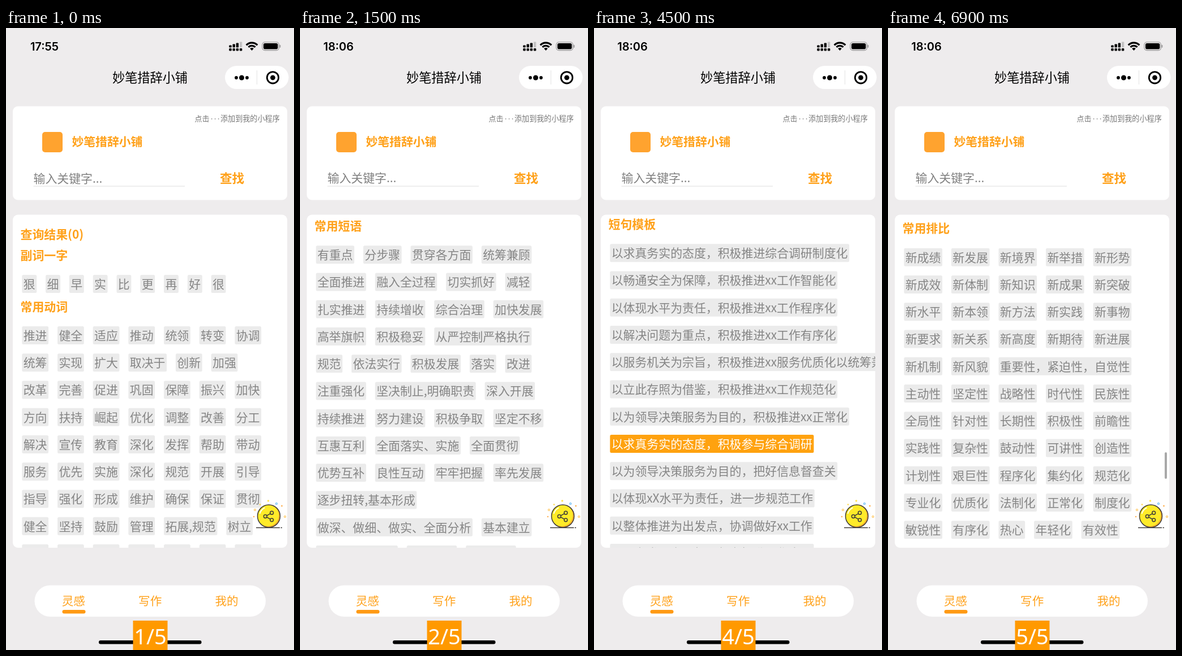
Recreate the animation shown at these times as an HTML page with a canvas. Size 509 px wide and 1101 px high, loop 7500 ms.

```html
<!DOCTYPE html>
<html lang="zh-CN">
<head>
<meta charset="utf-8">
<title>妙笔措辞小铺</title>
<style>
html, body { margin: 0; width: 100%; height: 100%; overflow: hidden; background: #eeeced; }
canvas { display: block; width: 509px; height: 1101px; }
</style>
</head>
<body>
<canvas id="stage"></canvas>
<script>
const W = 509, H = 1101, HOLD = 1500;
const CJK = '"Noto Sans CJK SC", "Noto Sans CJK JP", "Noto Sans CJK", sans-serif';
const ORANGE = '#ffa11a', GREY = '#858585', CHIP = '#ebebeb';
const EM = 20.9, ROW = 48.25, CHIP_H = 32, GAP = 15.9, LEFT = 28.3;
const APP = '妙笔措辞小铺';

// Rows are separated by lines, chips by spaces; * marks the selected chip.
const pages = [
  {
    clock: '17:55', inputY: 266,
    heads: [['查询结果(0)', 365], ['副词一字', 402], ['常用动词', 493]],
    blocks: [
      [453, '狠 细 早 实 比 更 再 好 很'],
      [544, `推进 健全 适应 推动 统领 转变 协调
统筹 实现 扩大 取决于 创新 加强
改革 完善 促进 巩固 保障 振兴 加快
方向 扶持 崛起 优化 调整 改善 分工
解决 宣传 教育 深化 发挥 帮助 带动
服务 优先 实施 深化 规范 开展 引导
指导 强化 形成 维护 确保 保证 贯彻
健全 坚持 鼓励 管理 拓展,规范 树立
提高 增强 完成 落实 建立 构建 加大`]
    ]
  },
  {
    clock: '18:06', inputY: 265,
    heads: [['常用短语', 350.5]],
    blocks: [[401.3, `有重点 分步骤 贯穿各方面 统筹兼顾
全面推进 融入全过程 切实抓好 减轻
扎实推进 持续增收 综合治理 加快发展
高举旗帜 积极稳妥 从严控制严格执行
规范 依法实行 积极发展 落实 改进
注重强化 坚决制止,明确职责 深入开展
持续推进 努力建设 积极争取 坚定不移
互惠互利 全面落实、实施 全面贯彻
优势互补 良性互动 牢牢把握 率先发展
逐步扭转,基本形成
做深、做细、做实、全面分析 基本建立
(有序)有效有力 稳步提升 不断完善`]]
  },
  {
    clock: '18:06', inputY: 265, bar: 531,
    heads: [['常用名词', 349.5]],
    blocks: [[400.5, `反映 速度 诉求 任务 形势 本质属性
重要保证 总体布局 关系 力度 战略任务
突出地位 决策部署 最大限度 内在要求
结合点 重要进展 体制机制 基本纲领
基本方略 科学性 理念意识 基本经验
基本路线 落脚点 秩序 要务 出发点
协调性 指导思想 核心 积极因素 主体
水平 方针 结构 增量 规模 标准 比重
办法 主体 作用 方式 特色 主导 差距
渠道 纽带 体系 负担 *项目 需求 倾向
资源 制度 途径 秩序 环境 主体 权威
积极性 动力 机制 目标,任务 成果 效益`]]
  },
  {
    clock: '18:06', inputY: 265,
    heads: [['短句模板', 347]],
    blocks: [[398.2, `以求真务实的态度，积极推进综合调研制度化
以畅通安全为保障，积极推进xx工作智能化
以体现水平为责任，积极推进xx工作程序化
以解决问题为重点，积极推进xx工作有序化
以服务机关为宗旨，积极推进xx服务优质化以统筹兼顾
以立此存照为借鉴，积极推进xx工作规范化
以为领导决策服务为目的，积极推进xx正常化
*以求真务实的态度，积极参与综合调研
以为领导决策服务为目的，把好信息督查关
以体现xX水平为责任，进一步规范工作
以整体推进为出发点，协调做好xx工作
以服务发展为目标，努力提升工作水平`]]
  },
  {
    clock: '18:06', inputY: 265, bar: 751,
    heads: [['常用排比', 354.5]],
    blocks: [[405.7, `新成绩 新发展 新境界 新举措 新形势
新成效 新体制 新知识 新成果 新突破
新水平 新本领 新方法 新实践 新事物
新要求 新关系 新高度 新期待 新进展
新机制 新风貌 重要性，紧迫性，自觉性
主动性 坚定性 战略性 时代性 民族性
全局性 针对性 长期性 积极性 前瞻性
实践性 复杂性 鼓动性 可讲性 创造性
计划性 艰巨性 程序化 集约化 规范化
专业化 优质化 法制化 正常化 制度化
敏锐性 有序化 热心 年轻化 有效性`]]
  }
];

const canvas = document.getElementById('stage');
const ctx = canvas.getContext('2d');
const dpr = window.devicePixelRatio || 1;
canvas.width = W * dpr;
canvas.height = H * dpr;
ctx.scale(dpr, dpr);

function box(x, y, w, h, r, color) {
  ctx.fillStyle = color;
  ctx.beginPath();
  ctx.roundRect(x, y, w, h, r);
  ctx.fill();
}

function dot(x, y, r, color) {
  ctx.fillStyle = color;
  ctx.beginPath();
  ctx.arc(x, y, r, 0, Math.PI * 2);
  ctx.fill();
}

function ring(x, y, r, width, color) {
  ctx.strokeStyle = color;
  ctx.lineWidth = width;
  ctx.beginPath();
  ctx.arc(x, y, r, 0, Math.PI * 2);
  ctx.stroke();
}

function line(color, width, ...pts) {
  ctx.strokeStyle = color;
  ctx.lineWidth = width;
  ctx.beginPath();
  pts.forEach(([x, y]) => ctx.lineTo(x, y));
  ctx.stroke();
}

function write(str, x, base, font, color, align = 'left') {
  ctx.font = font;
  ctx.fillStyle = color;
  ctx.textAlign = align;
  ctx.fillText(str, x, base);
}

// Chinese text, placed by the vertical centre of its em box.
function han(str, x, midY, size, color, weight = 400, align = 'left') {
  write(str, x, midY + size * 0.38, `${weight} ${size}px ${CJK}`, color, align);
}

function statusBar(clock) {
  write(clock, 68, 40, '600 20px Inter, sans-serif', '#000', 'center');
  for (let i = 0; i < 4; i++) {
    const x = 394.3 + i * 6.2, top = 30.5 - i * 2;
    box(x, top, 4.4, 34.5 - top, 1, i < 3 ? '#000' : '#c4c3c4');
    box(x, 36, 4.4, 4.4, 1.2, '#000');
  }
  ctx.strokeStyle = '#000';
  ctx.lineWidth = 3.2;
  [13.4, 8.2].forEach(r => {
    ctx.beginPath();
    ctx.arc(434.5, 39.5, r, -Math.PI * 0.76, -Math.PI * 0.24);
    ctx.stroke();
  });
  ctx.fillStyle = '#000';
  ctx.beginPath();
  ctx.moveTo(434.5, 40);
  ctx.arc(434.5, 39.5, 4.6, -Math.PI * 0.76, -Math.PI * 0.24);
  ctx.fill();
  ctx.strokeStyle = '#949394';
  ctx.lineWidth = 1.2;
  ctx.beginPath();
  ctx.roundRect(453, 25, 29.4, 14.6, 4.5);
  ctx.stroke();
  box(455, 27, 25.4, 10.6, 2.8, '#000');
  box(483.6, 29.8, 1.7, 5, 1, '#949394');
}

function navBar() {
  han(APP, 254.5, 88, 22.2, '#000', 500, 'center');
  box(387, 67, 112.5, 41, 20.5, '#fff');
  dot(407, 88, 2.9, '#000');
  dot(416.5, 88, 4.5, '#000');
  dot(426, 88, 2.9, '#000');
  line('#e4e4e4', 1, [443.5, 75], [443.5, 100]);
  ring(471.5, 87.8, 10.2, 2.8, '#000');
  dot(471.5, 87.8, 4.4, '#000');
}

function searchCard(inputY) {
  box(12, 138.5, 485, 166, 9, '#fff');
  han('点击', 333.5, 160.5, 13, '#777');
  [363.7, 369.7, 375.7].forEach(x =>
    write('·', x, 165, '13px Inter, sans-serif', '#777', 'center'));
  han('添加到我的小程序', 379, 160.5, 13.1, '#777');
  box(64, 184, 36, 36, 5, '#ffa32f');
  han(APP, 116.5, 201.5, 20.8, ORANGE, 700);
  han('输入关键字...', 48.5, inputY, EM, '#808080');
  line('#dedede', 1, [48.5, 280], [316, 280]);
  han('查找', 378, 266, 21.6, ORANGE, 700);
}

function chipRow(row, midY) {
  let x = LEFT;
  row.split(' ').forEach(item => {
    const on = item[0] === '*';
    const word = on ? item.slice(1) : item;
    ctx.font = `400 ${EM}px ${CJK}`;
    const w = ctx.measureText(word).width + 5;
    box(x, midY - CHIP_H / 2, w, CHIP_H, 2.5, on ? '#ffa20f' : CHIP);
    han(word, x + 2.4, midY, EM, on ? '#fff' : GREY);
    x += w + GAP;
  });
}

function listCard(page) {
  box(12, 330.5, 485, 589.5, 9, '#fff');
  ctx.save();
  ctx.beginPath();
  ctx.roundRect(12, 330.5, 485, 589.5, 9);
  ctx.clip();
  page.heads.forEach(([str, y]) => han(str, 25.5, y, EM, ORANGE, 700));
  page.blocks.forEach(([top, rows]) =>
    rows.split('\n').forEach((row, i) => chipRow(row, top + i * ROW)));
  if (page.bar) box(489, page.bar, 4, 47, 2, '#a8a8a8');
  ctx.restore();
}

function shareBadge() {
  const ink = '#3d3a38', cx = 464.5, cy = 864;
  dot(cx, cy, 20, '#ffb52e');
  ctx.save();
  ctx.beginPath();
  ctx.arc(cx, cy, 20, 0, Math.PI * 2);
  ctx.clip();
  dot(cx - 2, cy - 1.5, 19.5, '#ffeb29');
  ctx.restore();
  ring(cx, cy, 20, 1.5, ink);
  ctx.strokeStyle = '#fff';
  ctx.lineWidth = 1.8;
  ctx.beginPath();
  ctx.arc(cx, cy, 16.5, Math.PI * 1.08, Math.PI * 1.36);
  ctx.stroke();
  line(ink, 1.5, [442, 884.5], [484, 884.5]);
  line(ink, 1.5, [485.5, 884.5], [488, 884.5]);
  line(ink, 1.5, [469.5, 858.3], [458.3, 864.5], [469.5, 870.7]);
  [[458.3, 864.5], [469.7, 858.2], [469.7, 870.8]].forEach(([x, y]) => {
    dot(x, y, 2.9, '#ffeb29');
    ring(x, y, 2.9, 1.5, ink);
  });
  dot(463.5, 837, 1.8, '#ffe45a');
  dot(449, 843.5, 1.3, '#ffd84a');
  dot(487.5, 846, 1.4, '#ffb45a');
  dot(438, 865, 1.3, '#ffb45a');
  ring(478, 842, 1.5, 1.1, '#55b5f5');
  ring(440, 853, 1.5, 1.1, '#ffc04a');
  ring(493, 865, 1.5, 1.1, '#ffc04a');
}

function footer(index) {
  box(50.5, 986.5, 408.5, 55.5, 27.7, '#fff');
  ['灵感', '写作', '我的'].forEach((tab, i) =>
    han(tab, 119.3 + i * 135.4, 1014, 20.6, ORANGE, 400, 'center'));
  box(99.5, 1030, 41, 6.6, 3.3, '#ff9a14');
  box(164, 1084, 181.5, 6.4, 3.2, '#000');
  box(224.5, 1049, 61, 52, 0, '#ff9900');
  write(`${index + 1}/${pages.length}`, 255, 1090.5,
    '38px "Noto Sans", sans-serif', '#fff', 'center');
}

function draw(index) {
  const page = pages[index];
  ctx.fillStyle = '#eeeced';
  ctx.fillRect(0, 0, W, H);
  statusBar(page.clock);
  navBar();
  searchCard(page.inputY);
  listCard(page);
  shareBadge();
  footer(index);
}

const start = performance.now();
function tick() {
  const t = performance.now() - start;
  draw(Math.floor(t / HOLD) % pages.length);
  requestAnimationFrame(tick);
}
tick();
</script>
</body>
</html>
```
